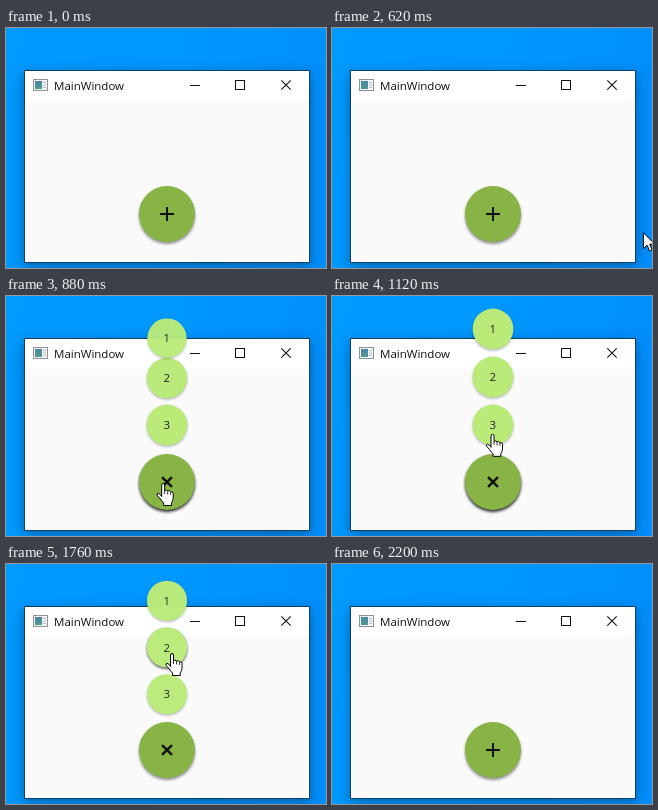
An HTML page that plays this animation: 320x240 px, repeating every 3260 ms.

```html
<!DOCTYPE html>
<html lang="en">
<head>
<meta charset="utf-8">
<title>Floating action menu</title>
<style>
  html, body { margin: 0; width: 100%; height: 100%; overflow: hidden; background: #0097ff; }
  svg { display: block; width: 100vw; height: 100vh; }
  text { font-family: "Open Sans", "Noto Sans", sans-serif; }
</style>
</head>
<body>
<svg id="stage" viewBox="0 0 320 240" xmlns="http://www.w3.org/2000/svg">
  <defs>
    <linearGradient id="sky" x2="1" y2=".25">
      <stop offset="0" stop-color="#009bff"/>
      <stop offset=".6" stop-color="#0096ff"/>
      <stop offset="1" stop-color="#008ffb"/>
    </linearGradient>
    <linearGradient id="pane" x2="0" y2="1">
      <stop offset="0" stop-color="#4a86a8"/>
      <stop offset="1" stop-color="#4f9a8c"/>
    </linearGradient>
    <filter id="far" x="-20%" y="-20%" width="140%" height="140%"><feGaussianBlur stdDeviation="7"/></filter>
    <filter id="near" x="-30%" y="-30%" width="160%" height="160%"><feGaussianBlur stdDeviation="1.8"/></filter>
    <clipPath id="popup"><rect width="320" height="158"/></clipPath>
  </defs>

  <rect width="320" height="240" fill="url(#sky)"/>
  <rect x="18" y="46" width="286" height="192" fill="#012c55" opacity=".5" filter="url(#far)"/>
  <rect x="18.5" y="42.5" width="285" height="192" fill="#fafafa" stroke="#12405f"/>
  <rect x="19" y="43" width="284" height="30" fill="#fff"/>

  <g id="appIcon">
    <rect x="27.5" y="51.5" width="14" height="11" fill="#f4f4f4" stroke="#8b9299"/>
    <rect x="29" y="53" width="7" height="8" fill="url(#pane)"/>
    <path d="M37 54.5h3M37 57h3M37 59.5h3" stroke="#b4bcc4"/>
  </g>
  <text x="48" y="62" font-size="11.5" fill="#111">MainWindow</text>
  <g fill="none" stroke="#111">
    <path d="M184 57.5h10"/>
    <rect x="229.5" y="52.5" width="9" height="9"/>
    <path d="M275.3 52.3l9.4 9.4M284.7 52.3l-9.4 9.4" stroke-width="1.1"/>
  </g>

  <g transform="translate(161 186)">
    <circle id="mainShade" cy="2" r="28" filter="url(#near)"/>
    <circle r="28" fill="#87b444"/>
    <path id="plus" d="M-7 0H7M0-7V7" stroke="#111"/>
  </g>
  <g id="items" clip-path="url(#popup)"></g>

  <path id="arrow" d="M.5 .5V16.5L4.2 13 6.7 18.7 9.2 17.6 6.8 12H11.8Z" fill="#fff" stroke="#000"/>
  <g id="hand">
    <path d="M-1.5 13.5V2Q-1.5 .5 0 .5T1.5 2V7.5Q3 6.4 4.5 8Q6.2 7 7.4 8.8Q10 8.3 10 10.6V15Q10 17.5 8.3 19.8V22.5H.5V20Q-1.5 18-2.7 16L-6 12.3Q-6.5 10.4-4.8 10.3Q-3 10.8-1.5 13.5Z"
      fill="#fff" stroke="#000" stroke-linejoin="round"/>
    <path d="M1.5 7.5V11M4.5 8.3V11.5M7.4 9.2V12" stroke="#000" stroke-width=".8"/>
  </g>
</svg>
<script>
const LOOP = 3260, OPEN = 676, CLOSE = 1759, HIDE = 1838;
const byId = id => document.getElementById(id);
const clamp = v => Math.max(0, Math.min(1, v));
const ramp = (t, from, span) => clamp((t - from) / span);
const sineOut = p => Math.sin(p * Math.PI / 2);
const show = (el, on) => el.setAttribute("visibility", on ? "visible" : "hidden");

// Pointer track: time, x, y
const track = [
  [618, 318, 205], [640, 266, 199], [660, 214, 193], [680, 182, 189],
  [700, 166, 188], [740, 157.5, 187], [960, 157, 187], [1040, 158, 168],
  [1120, 160.5, 138], [1180, 161.5, 128], [1280, 163, 111], [1380, 165.5, 91],
  [1440, 166, 89], [1840, 166, 89], [2090, 165, 89], [2100, 168, 90],
  [2120, 183, 93], [2140, 211, 98], [2160, 252, 105], [2180, 302, 113], [2200, 340, 118]
];

function pointer(t) {
  const i = track.findIndex(k => k[0] > t);
  if (i < 1) return null;
  const [a, b] = [track[i - 1], track[i]];
  const p = (t - a[0]) / (b[0] - a[0]);
  return [a[1] + (b[1] - a[1]) * p, a[2] + (b[2] - a[2]) * p];
}

// Nearest to the button opens first
const items = [3, 2, 1].map((label, i) => {
  byId("items").insertAdjacentHTML("beforeend",
    `<g><circle cy="1.3" r="20" filter="url(#near)"/>
     <circle r="20.4" fill="#baeb79"/>
     <text y="4.3" x="-.3" font-size="11.5" text-anchor="middle" fill="#222">${label}</text></g>`);
  const el = byId("items").lastElementChild;
  return { el, shade: el.firstElementChild, y: 129 - 48 * i, drop: 80 * (i + 1), delay: 20 * i };
});

function hover(t, on, off) {
  return ramp(t, on, 200) - ramp(t, off, 200);
}

function draw(t) {
  const glow = [hover(t, 1120, 1380), hover(t, 1385, HIDE), 0];
  const visible = t >= OPEN && t < HIDE;
  show(byId("items"), visible);
  items.forEach((it, i) => {
    const p = t < CLOSE
      ? sineOut(ramp(t, OPEN + it.delay, 200))
      : 1 - sineOut(ramp(t, CLOSE, 200));
    it.el.setAttribute("transform", `translate(161 ${it.y + it.drop * (1 - p)}) scale(${p})`);
    it.el.setAttribute("opacity", p);
    it.shade.setAttribute("opacity", .35 + .5 * glow[i]);
  });

  const turn = t < CLOSE ? ramp(t, OPEN, 100) : 1 - ramp(t, CLOSE + 2, 76);
  byId("plus").setAttribute("transform", `rotate(${45 * turn})`);
  byId("plus").setAttribute("stroke-width", 2 + .5 * turn);
  byId("mainShade").setAttribute("opacity", .45 + .4 * hover(t, 690, 1130));

  const at = pointer(t);
  const isHand = t >= OPEN && t < HIDE;
  show(byId("hand"), at && isHand);
  show(byId("arrow"), at && !isHand && t < 2198);
  if (at) byId(isHand ? "hand" : "arrow").setAttribute("transform", `translate(${at[0]} ${at[1]})`);
}

function tick() {
  draw(performance.now() % LOOP);
  requestAnimationFrame(tick);
}
tick();
</script>
</body>
</html>
```
